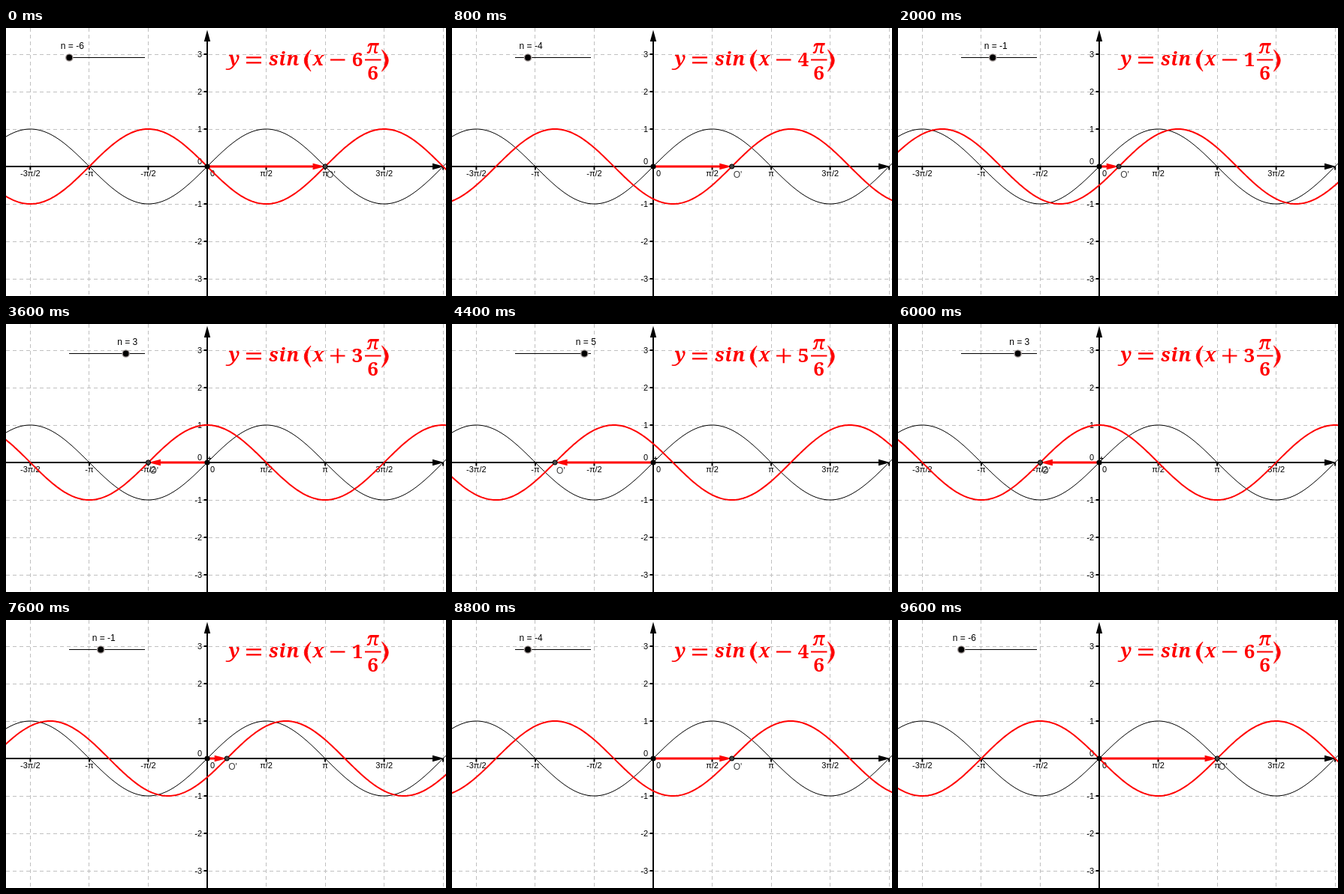
Recreate the animation shown at these times as an HTML page. Size 586x358 px, loop 10 s.

```html
<!DOCTYPE html>
<html lang="en">
<head>
<meta charset="utf-8">
<title>Phase shift of a sine curve</title>
<style>
  html, body { margin: 0; width: 100%; height: 100%; overflow: hidden; background: #fff; }
  svg { display: block; }
  text { font-family: "Liberation Sans", Arial, sans-serif; font-size: 11px; }
  .mid { text-anchor: middle; }
  .end { text-anchor: end; }
  .n { font-size: 12px; }
  .math text { font: italic bold 25px "Noto Serif", "Liberation Serif", serif; text-anchor: middle; }
  .math .num { font-style: normal; font-size: 26px; }
</style>
</head>
<body>
<svg id="stage" width="586" height="358" viewBox="0 0 586 358">
  <g id="grid" stroke="#c0c0c0" stroke-dasharray="5 4"></g>
  <g stroke="#000" stroke-width="2">
    <path d="M0 185H570M268 358V16"/>
    <path id="ticks"/>
  </g>
  <path d="M583.5 185L568 180.8V189.2ZM268 2.5L263.8 18H272.2Z"/>
  <g id="labels"></g>
  <path id="base" fill="none" stroke="#000"/>
  <path id="shifted" fill="none" stroke="#f00" stroke-width="2"/>

  <path d="M84 39.5H185" stroke="#000"/>
  <circle class="knob" cy="39.5" r="5.3" fill="#a39a98"/>
  <circle class="knob" cy="39.5" r="3.9"/>
  <text id="value" class="n" y="28"></text>

  <path id="shaft" stroke="#f00" stroke-width="3"/>
  <path id="head" fill="#f00"/>
  <path id="cross" d="M268.5 179.5H273.5M271 177V182" stroke="#000"/>
  <circle cx="268" cy="185" r="3.6"/>
  <circle id="point" cy="185" r="3.1" fill="#444" stroke="#000"/>
  <text id="name" class="n" y="200" fill="#404040">O'</text>

  <g class="math" fill="#f00">
    <text x="304" y="50">y</text>
    <text x="356.5" y="50">s</text>
    <text x="368" y="50">i</text>
    <text x="382" y="50">n</text>
    <text x="416" y="50">x</text>
    <text id="factor" class="num" x="468" y="50.5"></text>
    <text x="488.5" y="34">π</text>
    <text class="num" x="488.5" y="69">6</text>
    <path d="M320 39.4H340M320 46.4H340M478 42.5H499.5" stroke="#f00" stroke-width="2.2"/>
    <path id="sign" stroke="#f00" stroke-width="2.2"/>
    <path d="M406 29Q388.5 43.5 406 58Q396.5 43.5 406 29ZM500.500 29Q518 43.5 500.500 58Q510 43.5 500.500 29Z" stroke="#f00" stroke-width=".8"/>
  </g>
</svg>
<script>
const $ = id => document.getElementById(id);
const set = (el, attrs) => { for (const k in attrs) el.setAttribute(k, attrs[k]); };
const OX = 268, OY = 185, UNIT = 50, QUARTER = UNIT * Math.PI / 2;
const STEP = 400, PEAK = 12;

function add(parent, tag, attrs, text) {
  const el = document.createElementNS("http://www.w3.org/2000/svg", tag);
  set(el, attrs);
  if (text) el.textContent = text;
  parent.appendChild(el);
}

function sine(phase) {
  let d = "";
  for (let x = -2; x <= 588; x += 2) {
    const y = OY - UNIT * Math.sin((x - OX) / UNIT + phase);
    d += (d ? "L" : "M") + x + " " + y.toFixed(2);
  }
  return d;
}

function buildAxes() {
  const names = ["-3π/2", "-π", "-π/2", "", "π/2", "π", "3π/2", ""];
  let ticks = "";
  names.forEach((name, i) => {
    const x = OX + (i - 3) * QUARTER;
    const gx = Math.floor(x) + 0.5;
    if (i !== 3) {
      add($("grid"), "path", { d: `M${gx} 0V358` });
      ticks += `M${x} 185V189.5`;
    }
    if (name) add($("labels"), "text", { x, y: 198, class: "mid" }, name);
  });
  for (let v = -3; v <= 3; v++) {
    const y = OY - v * UNIT;
    if (v) {
      add($("grid"), "path", { d: `M0 ${y + 0.5}H586` });
      ticks += `M263.5 ${y}H268`;
    }
    add($("labels"), "text", { x: 261, y: v ? y + 4 : 182, class: "end" }, String(v));
  }
  add($("labels"), "text", { x: 272, y: 198 }, "0");
  set($("ticks"), { d: ticks });
  set($("base"), { d: sine(0) });
}

function draw(n) {
  const px = OX - n * QUARTER / 3;
  const knob = 84.3 + (n + 6) * 8.37;
  const back = px + Math.sign(n) * 16.5;

  set($("shifted"), { d: sine(n * Math.PI / 6) });
  document.querySelectorAll(".knob").forEach(el => set(el, { cx: knob }));
  set($("value"), { x: knob - 11.5 });
  $("value").textContent = "n = " + n;

  set($("shaft"), { d: n ? `M${OX} 185H${back}` : "" });
  set($("head"), { d: n ? `M${px} 185L${back} 180.8V189.2Z` : "" });
  set($("cross"), { visibility: n > 0 ? "visible" : "hidden" });
  set($("point"), { cx: px });
  set($("name"), { x: px + 2 });

  $("factor").textContent = Math.abs(n);
  set($("sign"), { d: "M432 42.5H451.500" + (n < 0 ? "" : "M441.7 32.8V52.2") });
}

let shown = null;
function tick(now) {
  const k = Math.floor(now % 10000 / STEP);
  const n = 6 - Math.abs(k - PEAK);
  if (n !== shown) draw(shown = n);
  requestAnimationFrame(tick);
}

buildAxes();
draw(-6);
requestAnimationFrame(tick);
</script>
</body>
</html>
```
